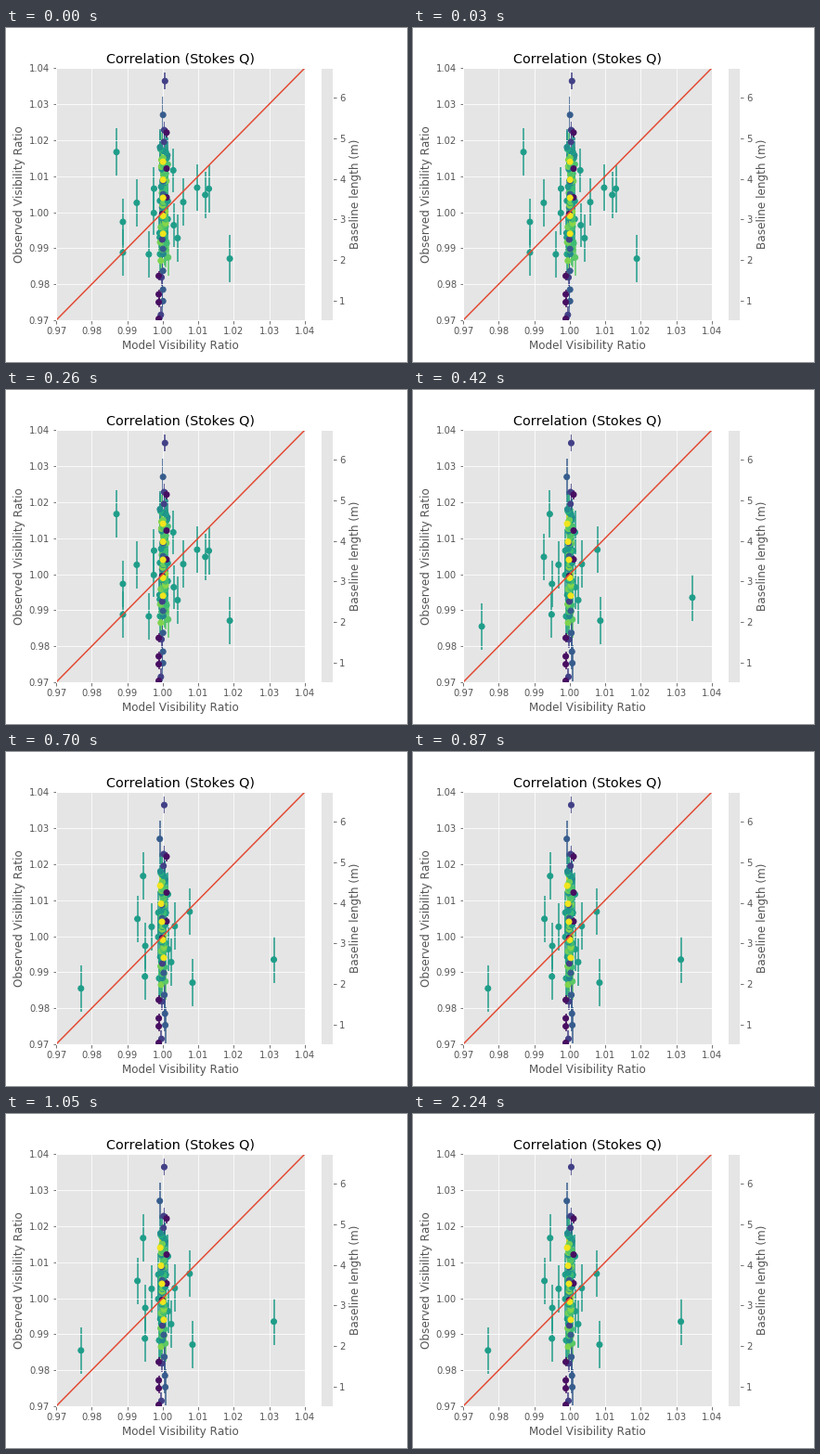
A matplotlib script that plays this animation: 432x360 px, repeating every 3.03 s.

```python
import numpy as np
import matplotlib.pyplot as plt
from matplotlib.animation import FuncAnimation
from matplotlib.collections import LineCollection

plt.style.use("ggplot")
plt.rcParams.update({"font.family": "DejaVu Sans", "font.size": 10,
                     "text.kerning_factor": 6})

FRAMES, STEP = 101, 30
JUMP = 14  # step at which the fit improves
BASE_MIN, BASE_MAX = 0.52, 6.73
rng = np.random.default_rng(4)


def group(before, after, y, err, base):
    """Rows of x before, x after, y, error (thousandths from 1) and baseline."""
    return np.column_stack(np.broadcast_arrays(before, after, y, err, base))


def outliers():
    """Poorly fitted teal points: x before, x after, y."""
    keys = [(-13, -5.5, 16.7), (-11.2, -4.9, -2.7), (-11.2, -5, -11.2),
            (-7.3, -3.1, 2.6), (-3.9, -1, -11.7), (4.2, 2.4, -7.2),
            (5.8, 3.4, 2.8), (9.7, 7.6, 6.8), (12, -7.1, 4.8),
            (13, 0.9, 6.5), (18.9, 8.4, -12.9), (-60, -23, -14.5),
            (60, 31.3, -6.5)]
    return group(*np.transpose(keys), 6.5, 3.95)


def fringe(count=14):
    """Teal points just outside the central column."""
    x = rng.normal(0.3, 1.7, count)
    return group(x, 0.5 * x, np.linspace(-7, 15, count), 6, 3.95)


def crowd(count=66):
    """Dense cloud of longer baselines around a ratio of one."""
    x = rng.normal(0.3, 0.55, count)
    y = np.linspace(-13, 18, count) + rng.normal(0, 0.5, count)
    base = rng.uniform(3.2, 5.7, count)
    return group(x, 0.6 * x - 0.15, y, 5, base)


def short_baselines():
    """Sparse points spread far in y; shorter baselines have smaller errors."""
    blue = np.array([27, 8.6, 5, -10.2, -16.3, -21.5, -24.7])
    purple = np.array([36.4, 22.8, 19.5, -7.6, -18.1, -28.5])
    dark = np.array([22.1, 12.1, 4.1, -0.5, -17.7, -22.8, -25, -29.6])
    edge = 1.1 * np.clip(dark / 4, -1, 1)
    return np.vstack([
        group(0.1, -0.03 * blue, blue, 5, 2.3),
        group(0.018 * purple, 0.012 * purple, purple, 2.3, 1.7),
        group(edge, edge, dark, 1.3, 0.75),
    ])


def long_baselines():
    y = np.linspace(14, -6, 5)
    return group(0.1, -0.05 * y, y, 3, 6.6)


points = np.vstack([outliers(), fringe(), crowd(), short_baselines(),
                    long_baselines()])
x_before, x_after, y, err, base = points.T
y, err = 1 + y / 1000, err / 1000
colors = plt.cm.viridis((base - BASE_MIN) / (BASE_MAX - BASE_MIN))

fig = plt.figure(figsize=(6, 5), dpi=72, facecolor="white")
ax = fig.add_axes([0.125, 0.125, 0.62, 0.755])
ax.set(xlim=(0.97, 1.04), ylim=(0.97, 1.04),
       xlabel="Model Visibility Ratio", ylabel="Observed Visibility Ratio")
ax.set_title("Correlation (Stokes Q)")
ticks = np.linspace(0.97, 1.04, 8)
labels = [f"{t:.2f}" for t in ticks]
ax.set_xticks(ticks, labels)
ax.set_yticks(ticks, labels)

# Error bars lie beneath the grid, dots above it
bars = LineCollection([], colors=colors, linewidths=1.5, zorder=0)
ax.add_collection(bars, autolim=False)
dots = ax.scatter(np.ones_like(y), y, s=36, c=colors, linewidths=1, zorder=1)
ax.plot([0.97, 1.04], [0.97, 1.04], color="#E24A33", lw=1.5, zorder=2)

scale = fig.add_axes([0.78375, 0.125, 0.03146, 0.755])
scale.set(xticks=[], ylim=(BASE_MIN, BASE_MAX), yticks=range(1, 7))
scale.grid(False)
scale.yaxis.tick_right()
scale.yaxis.set_label_position("right")
scale.set_ylabel("Baseline length (m)")


def positions(i):
    """Jump to the better fit, overshooting for one step."""
    if i < JUMP:
        return x_before
    overshoot = 0.0033 * x_after * np.abs(x_after)
    return x_after + overshoot * (i == JUMP)


def update(i):
    x = 1 + positions(i) / 1000
    dots.set_offsets(np.column_stack([x, y]))
    low, high = np.column_stack([x, y - err]), np.column_stack([x, y + err])
    bars.set_segments(np.stack([low, high], axis=1))
    return bars, dots


anim = FuncAnimation(fig, update, frames=FRAMES, interval=STEP, repeat=True)
plt.show()
```
